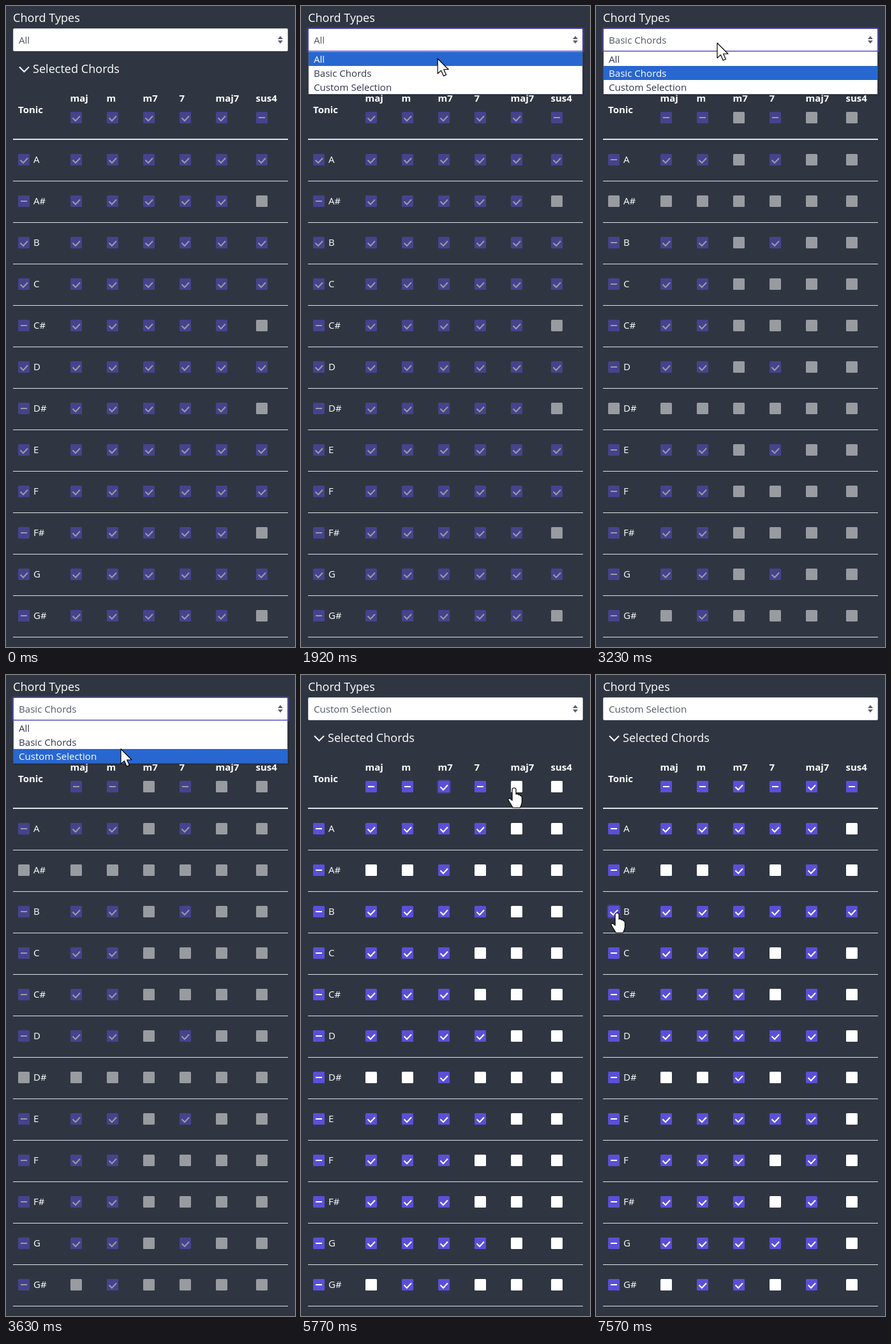
These frames come from a looping animation (453x1005 px, 8000 ms). An HTML page:

```html
<!DOCTYPE html>
<html lang="en">
<head>
<meta charset="utf-8">
<title>Chord selection</title>
<style>
  html, body { margin: 0; width: 100%; height: 100%; overflow: hidden; background: #303641; }
  svg { display: block; width: 100%; height: 100%; font: 15px "Open Sans", "Noto Sans", sans-serif; }
  .light { fill: #fff; }
  .title { font-size: 18.1px; }
  .head { font-weight: 700; }
  .tonic { font-weight: 500; }
  .value, .option { font-size: 15.1px; fill: #505666; }
  .option { fill: #30354e; }
  .option.active { fill: #fff; }
  .mark { fill: none; stroke: #fff; stroke-width: 2; }
  .ring { fill: none; stroke: #5a50d8; stroke-width: 2; stroke-opacity: .38; }
  .pointer { fill: #fff; stroke: #000; stroke-width: 1.2; stroke-linejoin: round; }
</style>
</head>
<body>
<svg id="stage" viewBox="0 0 453 1005" preserveAspectRatio="none"></svg>
<script>
const LOOP = 8000, STEP = 70;
const stage = document.getElementById('stage');
const TONICS = 'A A# B C C# D D# E F F# G G#'.split(' ');
const TYPES = ['maj', 'm', 'm7', '7', 'maj7', 'sus4'];
const COLUMN_X = [110, 167, 224, 281, 338, 401];
const TONIC_X = 28, HEAD_Y = 175;
const OPTIONS = ['All', 'Basic Chords', 'Custom Selection'];
const rowY = row => 241 + 65 * row;

function add(tag, attrs, parent = stage, text) {
  const el = document.createElementNS('http://www.w3.org/2000/svg', tag);
  for (const key in attrs) el.setAttribute(key, attrs[key]);
  if (text) el.textContent = text;
  parent.append(el);
  return el;
}
const label = (text, x, y, cls, parent) => add('text', { x, y, class: cls }, parent, text);
const show = (el, on) => el.setAttribute('visibility', on ? 'visible' : 'hidden');

// Chord grids, one string of twelve tonics per chord type
const FULL = '1'.repeat(12), EMPTY = '0'.repeat(12);
const allChords = [FULL, FULL, FULL, FULL, FULL, '101101011010'];
const basic = ['101111011110', '101111011111', EMPTY, '101001010010', EMPTY, EMPTY];
const withColumn = (grid, col) => grid.map((c, i) => i === col ? FULL : c);
const withRow = (grid, row) => grid.map(c => c.slice(0, row) + '1' + c.slice(row + 1));
const plusM7 = withColumn(basic, 2), plusMaj7 = withColumn(plusM7, 4);

const states = [
  { t: 0, grid: allChords, option: 0 },
  { t: 2260, grid: basic, option: 1 },
  { t: 4040, grid: basic, option: 2 },
  { t: 5210, grid: plusM7, option: 2, focus: [224, HEAD_Y] },
  { t: 6110, grid: plusMaj7, option: 2, focus: [338, HEAD_Y] },
  { t: 7360, grid: withRow(plusMaj7, 2), option: 2, focus: [TONIC_X, rowY(2)] }
];
const popups = [[970, 2260], [3160, 4040]];
const clicks = [[900, 1180], [2120, 2260], [3090, 3230], [3970, 4110], [5140, 5350], [5970, 6180], [7290, 7500]];
const path = [
  [70, 415, 988], [560, 250, 60], [630, 246, 38], [700, 245, 46],
  [1510, 245, 46], [2050, 202, 97],
  [2880, 202, 97], [3090, 190, 58], [3230, 190, 58], [3630, 180, 116],
  [3700, 180, 116], [3770, 179, 117],
  [4580, 179, 117], [4650, 192, 131], [5000, 223, 177],
  [5420, 223, 177], [5770, 334, 177],
  [6250, 334, 177], [6730, 120, 306], [7150, 33, 373], [LOOP, 33, 373]
];

const within = (t, spans) => spans.some(([a, b]) => t >= a && t < b);

function cursorAt(t) {
  let i = path.length - 2;
  while (i > 0 && path[i][0] > t) i--;
  const [t0, x0, y0] = path[i], [t1, x1, y1] = path[i + 1];
  const p = Math.floor((t - t0) / STEP) * STEP / (t1 - t0);
  const e = p * p * (3 - 2 * p);
  return [x0 + (x1 - x0) * e, y0 + (y1 - y0) * e];
}

// 0 unchecked, 1 checked, 2 partly checked
const summary = cells => !cells.includes('1') ? 0 : cells.includes('0') ? 2 : 1;

// Page
label('Chord Types', 11, 25, 'light title');
const selectRing = add('rect', { x: 10, y: 34.5, width: 433, height: 37.5, rx: 3, class: 'ring' });
const select = add('rect', { x: 11.5, y: 35.5, width: 430, height: 35, rx: 1.5, fill: '#fff' });
const value = label('All', 20, 59, 'value');
add('path', { d: 'M426 52l4-5 4 5zM426 54h8l-4 5z', fill: '#5c6170' });
add('path', { d: 'M21 95.5l7.5 7.5 7.5-7.5', class: 'mark' });
label('Selected Chords', 42, 105, 'light title');
label('Tonic', 19, 168, 'light head');
TYPES.forEach((type, i) => label(type, COLUMN_X[i] - 9.5, 150, 'light head'));
add('rect', { x: 11, y: 208, width: 431, height: 2, fill: '#dee2e6' });
TONICS.forEach((tonic, row) => {
  label(tonic, 43, rowY(row) + 5, 'light tonic');
  add('rect', { x: 11, y: rowY(row) + 33, width: 431, height: 1, fill: '#dee2e6' });
});

// Checkboxes
const boxes = [];
function addBox(x, y, read) {
  const g = add('g', { transform: `translate(${x} ${y})` });
  boxes.push({
    g, x, y, read,
    fill: add('rect', { x: -9, y: -9, width: 18, height: 18, rx: 1.5 }, g),
    check: add('path', { d: 'M-5.5 .5L-1 5 6-2.5', class: 'mark' }, g),
    dash: add('path', { d: 'M-5 0H5', class: 'mark' }, g)
  });
}
COLUMN_X.forEach((x, col) => {
  addBox(x, HEAD_Y, grid => summary(grid[col]));
  TONICS.forEach((_, row) => addBox(x, rowY(row), grid => +grid[col][row]));
});
TONICS.forEach((_, row) => addBox(TONIC_X, rowY(row), grid => summary(grid.map(c => c[row]).join(''))));
const boxRing = add('rect', { width: 20, height: 20, rx: 2.5, class: 'ring' });

// Popup list
const popup = add('g', {});
add('rect', { x: 11, y: 72, width: 433, height: 69, fill: '#000', opacity: .15 }, popup);
add('rect', { x: 11.5, y: 70.5, width: 430, height: 68, fill: '#fff', stroke: '#4a4d60' }, popup);
add('rect', { x: 11, y: 70, width: 431, height: 1.5, fill: '#5a50c8' }, popup);
const bar = add('rect', { x: 12, width: 429, height: 22, fill: '#2867d0' }, popup);
const options = OPTIONS.map((text, i) => label(text, 20, 89 + 22 * i, 'option', popup));

// Pointer
const halo = add('circle', { r: 21, fill: '#ff0', opacity: .55 });
const arrow = add('path', { class: 'pointer', d: 'M0 0V23.5L5.4 18.6 9.2 27.2 13.4 25.4 9.6 17H17Z' });
const hand = add('path', {
  class: 'pointer',
  d: 'M-3 2.5Q-3 0 0 0T3 2.5V10Q5 8.6 7 11Q9 10 10 12.5Q12.4 12.5 12.4 16V22Q12 26 9.5 31H-2Q-4 27-7 22.5Q-10.5 18-8.5 16.5Q-6.5 15.5-3 19.5Z'
});

function drawBoxes(now, before, p, enabled) {
  const mix = (a, b) => Math.round(a + (b - a) * p);
  for (const box of boxes) {
    const state = box.read(now.grid), old = box.read(before.grid);
    const from = old ? [90, 80, 216] : [255, 255, 255];
    const to = state ? [90, 80, 216] : [255, 255, 255];
    box.fill.setAttribute('fill', `rgb(${from.map((c, i) => mix(c, to[i]))})`);
    box.g.setAttribute('opacity', enabled ? 1 : .5);
    show(box.check, state === 1);
    show(box.dash, state === 2);
  }
}

function draw(t) {
  let k = states.length - 1;
  while (states[k].t > t) k--;
  const now = states[k], before = states[Math.max(0, k - 1)];
  const age = Math.floor((t - now.t) / STEP) * STEP;
  const fade = k ? 1 - (1 - Math.min(1, age / 140)) ** 2 : 1;
  drawBoxes(now, before, fade, now.option === 2);

  const [x, y] = cursorAt(t);
  const selectFocus = t >= 970 && !now.focus;
  value.textContent = OPTIONS[now.option];
  select.setAttribute('stroke', selectFocus ? '#5a50c8' : '#ced4da');
  show(selectRing, selectFocus);
  show(boxRing, !!now.focus);
  if (now.focus) boxRing.setAttribute('transform', `translate(${now.focus.map(c => c - 10)})`);

  const open = within(t, popups);
  popup.setAttribute('display', open ? 'inline' : 'none');
  if (open) {
    const active = y < 72 ? now.option : Math.min(2, Math.floor((y - 72) / 22));
    bar.setAttribute('y', 72 + 22 * active);
    options.forEach((el, i) => el.classList.toggle('active', i === active));
  }

  const entered = t >= 70;
  const overBox = now.option === 2 && boxes.some(b => Math.abs(b.x - x) < 10 && Math.abs(b.y - y) < 10);
  const place = `translate(${x.toFixed(1)} ${y.toFixed(1)})`;
  for (const el of [halo, arrow, hand]) el.setAttribute('transform', place);
  show(halo, within(t, clicks));
  show(arrow, entered && !overBox);
  show(hand, entered && overBox);
}

const start = performance.now();
function tick() {
  draw((performance.now() - start) % LOOP);
  requestAnimationFrame(tick);
}
tick();
</script>
</body>
</html>
```
